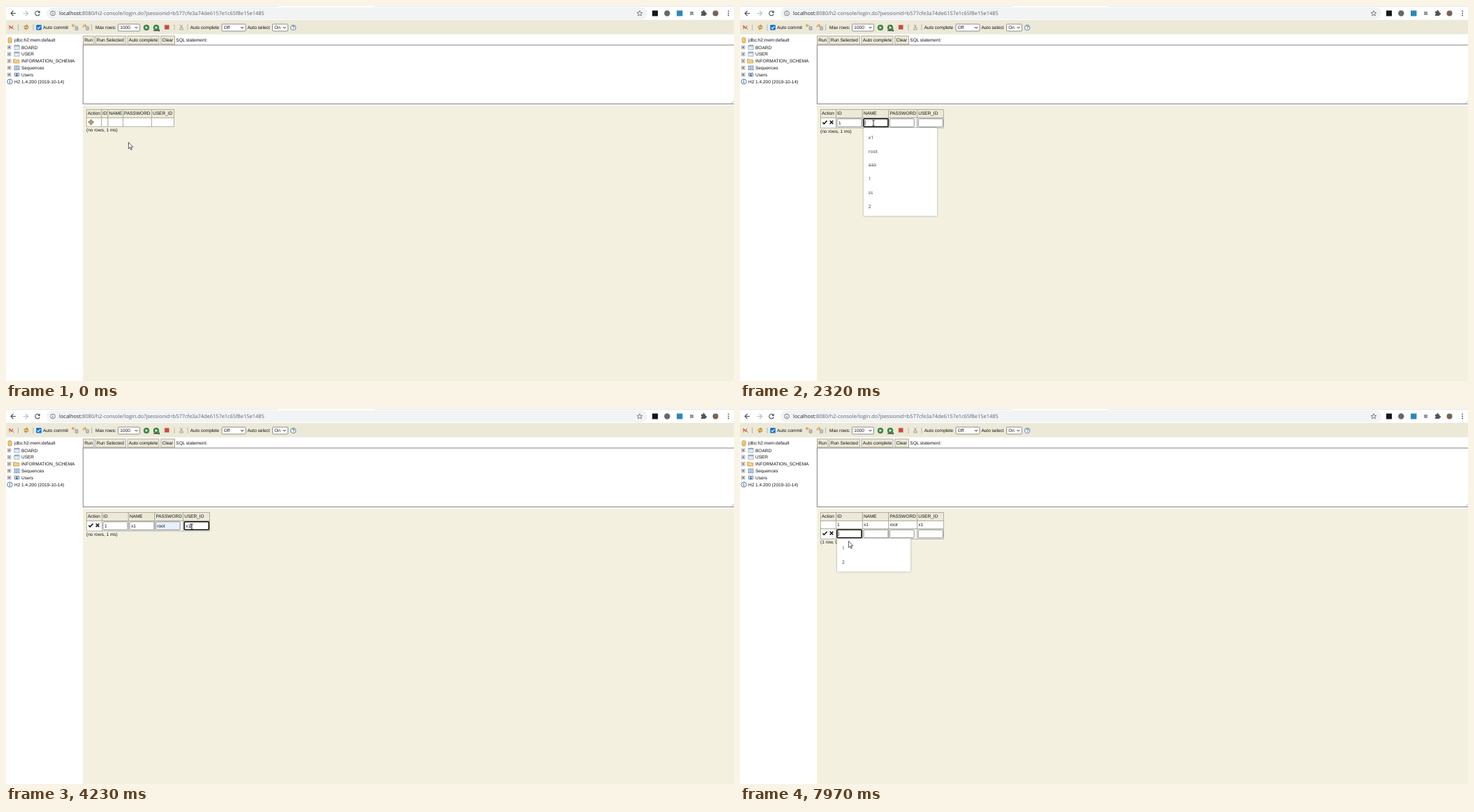
Animation, 1042 px wide and 538 px high, one loop 8000 ms. Source, as an HTML page:

```html
<!DOCTYPE html>
<html lang="en">
<head>
<meta charset="utf-8">
<title>Database console</title>
<style>
  html, body { margin: 0; width: 100%; height: 100%; overflow: hidden; background: #fff; }
  svg { display: block; width: 100%; height: 100%; }
  text { font: 6.5px "Liberation Sans", Arial, sans-serif; fill: #111; white-space: pre; text-rendering: geometricPrecision; }
  .ui { font-family: "Open Sans", "Noto Sans", sans-serif; font-size: 7.43px; fill: #5f6368; }
  .ui tspan { fill: #202124; }
  .item { font-family: "Open Sans", "Noto Sans", sans-serif; font-size: 6.7px; fill: #333; }
  .line { fill: none; stroke: #444; }
  .popup { filter: drop-shadow(0 .7px 1.2px #0006); }
</style>
</head>
<body>
<svg viewBox="0 0 1042 538" preserveAspectRatio="none">
  <g id="page"></g>
  <g id="live"></g>
</svg>
<script>
const LOOP = 8000;
const BEIGE = '#ece9d8', EDGE = '#aca899', GRAY = '#767676';

// Drawing helpers; text is placed by the middle of its capitals.
const text = (x, cy, s, cls = '') => `<text class="${cls}" x="${x}" y="${cy + 2.3}">${s}</text>`;
const box = (x, y, w, h, fill, stroke = 'none', more = '') =>
  `<rect x="${x}" y="${y}" width="${w}" height="${h}" fill="${fill}" stroke="${stroke}" ${more}/>`;
const disc = (x, y, r, fill, stroke = 'none', more = '') =>
  `<circle cx="${x}" cy="${y}" r="${r}" fill="${fill}" stroke="${stroke}" ${more}/>`;
const line = (d, color = '#444', width = 1, x = 0, y = 0) =>
  `<path class="line" transform="translate(${x} ${y})" d="${d}" style="stroke:${color};stroke-width:${width}"/>`;
const shape = (d, fill, x = 0, y = 0, more = '') =>
  `<path transform="translate(${x} ${y})" d="${d}" fill="${fill}" ${more}/>`;

function browserBar() {
  const info = disc(67, 10.5, 3.4, 'none', '#5f6368', 'stroke-width=".8"') +
    line('M67 10V12.4M67 8.4V9.2', '#5f6368', .9);
  return box(0, 0, 1042, 20, '#fff') +
    box(0, 0, 390, .8, '#dee1e6') + box(528, 0, 514, .8, '#dee1e6') +
    box(58, 2, 860, 17, '#f1f3f4', 'none', 'rx="8.5"') +
    line('M3.5 0H-3.5M0 -3.5L-3.5 0L0 3.5', '#4a4d51', 1.1, 10.5, 10.5) +
    line('M-3.5 0H3.5M0 -3.5L3.5 0L0 3.5', '#b9bbbe', 1.1, 28, 10.5) +
    line('M2.6 -2A3.3 3.3 0 1 0 3.2 1', '#4a4d51', 1.1, 45, 10.5) +
    shape('M3.6 -4V-.6H.2Z', '#4a4d51', 45, 10.5) + info +
    text(76, 10.6, '<tspan>localhost:</tspan>8080/h2-console/login.do?jsessionid=b577cfe3a74de6157e1c65f8e15e1485', 'ui') +
    shape('M0 -3.8L1.1 -1.2 3.8 -1 1.7 .8 2.4 3.4 0 2 -2.4 3.4 -1.7 .8 -3.8 -1 -1.1 -1.2Z', 'none', 907, 10.5, 'stroke="#5f6368" stroke-width=".8"') +
    box(925, 6.5, 8, 8, '#15161a') + disc(946.3, 10.5, 4.2, '#66686a') +
    box(960, 6.5, 8.4, 8, '#2c88b8') + box(979, 8, 5, 5, '#9a9a9a') +
    shape('M-3.6 -2.2H-1.2A1.3 1.3 0 1 1 1.2 -2.2H2.8V.1A1.3 1.3 0 1 1 2.8 2.4V4H-3.6V2.2A1.4 1.4 0 0 0 -3.6 -.4Z', '#505357', 998.5, 10) +
    disc(1015.5, 10.5, 4, '#7a6252') +
    [7.3, 10.4, 13.5].map(y => disc(1034, y, .9, '#4a4d51')).join('');
}

function select(x, w, label) {
  return box(x, 26, w, 10, '#fff', GRAY, 'rx="1.2" stroke-width=".8"') + text(x + 2.8, 31, label) +
    line('M-1.9 -1L0 1L1.9 -1', '#222', 1, x + w - 5, 31);
}

function toolbar() {
  const drum = x => box(x, 29.5, 4, 5, '#b8bfca', '#7b8494', 'rx="1" stroke-width=".6"');
  const play = x => disc(x, 31, 3.9, '#3f8f46', '#2d6b34', 'stroke-width=".6"') +
    shape('M-1.2 -2V2L2 0Z', '#fff', x, 31);
  return box(0, 20, 1042, 20.5, BEIGE) +
    [17.5, 39, 122.5, 241, 260].map(x => line('M0 26.5V35', EDGE, .8, x)).join('') +
    line('M-3 3V-2L0 2 2 -2.5M-3.5 -2.5L3.5 3', '#d0533c', 1, 8, 30.5) +
    line('M-3 .5C-3 -2 0 -3 2 -1.5M3 -.5C3 2 0 3 -2 1.5', '#d9962b', 1.5, 29, 30.5) +
    line('M.5 -4L2.5 -1.3 -.8 -.8M-.5 4L-2.5 1.3 .8 .8', '#a8721e', .8, 29, 30.5) +
    box(43.2, 27, 7.6, 7.6, '#1673d6', 'none', 'rx="1.2"') +
    line('M-2.2 0L-.6 1.7 2.3 -1.7', '#fff', 1.1, 47, 30.8) +
    text(53, 31, 'Auto commit') +
    drum(99) + line('M2 -2H-3M-1 -4L-3 -2 -1 0', '#d99a34', 1.1, 97.5, 30) +
    drum(114.5) + line('M-3 1V-2H1M-1 -4L1 -2 -1 0', '#d99a34', 1.1, 113.5, 30) +
    text(128, 31, 'Max rows:') + select(160.5, 31, '1000') +
    play(201) + play(215) + line('M211 35.3H220M219 33V36.5', '#222', .9) +
    box(227, 27.2, 6.4, 6.4, '#d8412f', '#b6aaa0', 'stroke-width=".7"') +
    line('M-2 -3.5L1 0M1.5 -3.5L-1 0M-2.5 3.5H2.5L1.5 .5H-1.5Z', '#999a92', .9, 251, 30.5) +
    text(263.7, 31, 'Auto complete') + select(309, 34, 'Off') +
    text(345.4, 31, 'Auto select') + select(381.5, 22, 'On') +
    disc(411.2, 31, 3.7, '#fff', '#4678a8', 'stroke-width=".9"') + text(409.4, 31, '?');
}

function tree() {
  const names = ['BOARD', 'USER', 'INFORMATION_SCHEMA', 'Sequences', 'Users'];
  const table = y => box(12, y - 3, 7, 6, '#fff', '#7590aa', 'stroke-width=".7"') +
    box(12, y - 3, 7, 1.6, '#7d9fc0') + line('M12 0H19M14.3 -2V3M16.7 -2V3', '#b3c4d4', .5, 0, y);
  const folder = y => shape('M-4 -2.5H-1L0 -1.5H4V3H-4Z', '#f6cf83', 14.7, y, 'stroke="#c5872c" stroke-width=".7"');
  const dots = y => [0, 1, 2].map(i => line('M11.5 0H19.5', '#3d6b9c', 1.3, 0, y - 2.2 + i * 2.4)).join('') +
    line('M14 -3V4M17 -3V4', '#fff', .7, 0, y);
  const people = y => line('M-2.3 -3Q-4 0 -2.3 3M2.3 -3Q4 0 2.3 3', '#2f5079', .9, 15.5, y) +
    disc(15.5, y - 1.4, 1.2, '#3f6796') + box(14.1, y, 2.8, 2.7, '#3f6796');
  const icons = [table, table, folder, dots, people];
  return box(3, 45.5, 5, 7.5, '#f3c773', '#bd832e', 'rx="1.6" stroke-width=".7"') +
    text(12, 49, 'jdbc:h2:mem:default') +
    names.map((name, i) => {
      const y = 59.2 + i * 9.8;
      return box(2.3, y - 2.2, 4.6, 4.6, '#fff', '#777', 'stroke-width=".6"') +
        line('M3.2 0H6M4.6 -1.4V1.4', '#222', .7, 0, y + .1) + icons[i](y) + text(22, y, name);
    }).join('') +
    disc(5.5, 108.5, 3.6, '#fff', '#3d6b9c', 'stroke-width=".9"') +
    line('M5.5 107.8V110.6M5.5 106V107', '#2f5079', 1) + text(12, 108.2, 'H2 1.4.200 (2019-10-14)');
}

function queryPane() {
  const buttons = [[110.5, 15.5, 'Run'], [128, 43.3, 'Run Selected'], [174, 45, 'Auto complete'], [221.8, 19.7, 'Clear']];
  return buttons.map(([x, w, s]) =>
      box(x, 43, w, 12, BEIGE, '#9b988b', 'stroke-width=".8"') + text(x + 1.8, 49, s)).join('') +
    text(243.3, 49, 'SQL statement:') +
    box(110.3, 56, 935, 84.5, '#fff', GRAY, 'stroke-width=".9"') +
    line('M1038.5 139.8L1042 136.5', GRAY, .6) +
    box(110, 143, 932, 395, '#f4f0e0');
}

// Pointer path: time, x, y.
const path = [
  [300, 175, 195], [840, 123, 168], [1110, 123, 168], [1410, 153, 168],
  [1900, 153, 168], [2200, 191, 168], [2690, 191, 168], [2850, 220, 167], [2980, 221, 167],
  [3220, 221, 167], [3480, 235, 186], [3620, 235, 186], [3930, 266, 169],
  [4290, 266, 169], [4770, 118, 166], [4850, 118, 166], [4910, 118, 168],
  [5700, 118, 168], [5800, 121, 172], [5940, 121, 172], [6070, 121, 176],
  [7050, 121, 176], [7400, 153, 179], [7640, 153, 179], [7960, 155, 189]
];
const clicks = [[870, 1080], [1440, 1690], [2200, 2300], [3130, 3220], [3530, 3620],
  [4020, 4080], [5060, 5400], [6380, 6530], [7420, 7610]];

function pointerAt(t) {
  const i = path.findIndex(p => p[0] > t);
  if (i === 0) return path[0].slice(1);
  if (i < 0) return path[path.length - 1].slice(1);
  const [a, b] = [path[i - 1], path[i]];
  const k = (t - a[0]) / (b[0] - a[0]), e = k * k * (3 - 2 * k);
  return [a[1] + (b[1] - a[1]) * e, a[2] + (b[2] - a[2]) * e];
}

const within = (t, a, b) => t >= a && t < b;
const heads = ['Action', 'ID', 'NAME', 'PASSWORD', 'USER_ID'];
const record = ['', '1', 'x1', 'root', 'x1'];
const fieldX = [139, 177, 214.3, 255.3];
const plainCols = [115.3, 136.5, 146, 167.5, 208.5, 240.5];
const editCols = [115.3, 137.5, 175.3, 212.8, 253.6, 291.5];

const row = (cols, y, h, fill, labels = []) => cols.slice(0, -1).map((x, i) =>
  box(x, y, cols[i + 1] - x, h, fill, EDGE, 'stroke-width=".9"') +
  (labels[i] ? text(x + 1.6, y + 5.6, labels[i]) : '')).join('');

const plus = y => shape('M-1.1 -3.5H1.1V-1.1H3.5V1.1H1.1V3.5H-1.1V1.1H-3.5V-1.1H-1.1Z', '#b9ae62', 121.7, y, 'stroke="#716b3c" stroke-width=".7"');
const okCancel = y => line('M-3 .2L-1 2.3 3.2 -2.3', '#111', 1.5, 121.3, y) +
  line('M-2.3 -2.3L2.3 2.3M2.3 -2.3L-2.3 2.3', '#111', 1.5, 131, y);
const rowIcons = y => line('M-2.5 2.5L2.5 -2.5M-3 3.2L-1 2.7', '#8b7f45', 1.4, 121.7, y) +
  line('M-2.2 -2.2L2.2 2.2M2.2 -2.2L-2.2 2.2', '#948a4c', 1.5, 131.5, y);

function formAt(t) {
  if (t >= 6530) return { focus: t >= 7420 ? 0 : -1, values: ['', '', '', ''] };
  const focus = t < 1440 || t >= 5060 ? -1 : t < 2200 ? 0 : t < 3130 ? 1 : t < 4020 ? 2 : 3;
  const typed = (a, b) => t < a ? '' : t < b ? 'x' : 'x1';
  return {
    focus,
    values: [t < 1830 ? '' : '1', typed(2480, 2600), t < 3390 ? '' : 'root', typed(4110, 4200)]
  };
}

function fields({ focus, values }, y, t) {
  const widths = { '': 0, '1': 3.6, x: 3.3, x1: 6.9 };
  return fieldX.map((x, i) => {
    const on = i === focus, fill = values[i] === 'root' ? '#e8f0fe' : '#fff';
    const caret = x + 2.2 + (widths[values[i]] || 0);
    return box(x, y, 35, 11.5, fill, on ? '#101010' : GRAY, `rx="1" stroke-width="${on ? 1.6 : .8}"`) +
      text(x + 2, y + 5.7, values[i]) +
      (on ? line('M0 -3.6V3.6', '#111', .7, caret, y + 5.8) : '');
  }).join('');
}

function popup(x, y, items, hover = -1) {
  return `<g class="popup">${box(x, y, 105.3, 8 + items.length * 19.7, '#fff', 'none', 'rx="1"')}</g>` +
    (hover < 0 ? '' : box(x, y + 4 + hover * 19.7, 105.3, 19.7, '#c8c8c8')) +
    items.map((s, i) => text(x + 7, y + 13.7 + i * 19.7, s, 'item')).join('');
}

function popups(t) {
  if (within(t, 2290, 2480)) return popup(176.8, 175, ['x1', 'root', 'aaa', '1', 'ss', '2']);
  if (within(t, 3200, 3620)) return popup(214.3, 175, ['root', 'aaa', '1', 'ss', 's', '2'], t < 3390 ? -1 : 0);
  if (within(t, 4050, 4110)) return popup(255.3, 175, ['x1', 'root', 'aaa', '1', 'ss', '2']);
  return t >= 7700 ? popup(139, 186, ['1', '2']) : '';
}

function resultTable(t) {
  if (t < 1050) return row(plainCols, 148.5, 12, BEIGE, heads) + row(plainCols, 160.5, 12.5, '#fff') +
    plus(166.7) + text(115, 177.3, '(no rows, 1 ms)');
  if (t < 5370) return row(editCols, 148.5, 12, BEIGE, heads) + row(editCols, 160.5, 14.5, '#fff') +
    okCancel(166.8) + fields(formAt(t), 161.8, t) + text(115, 179.5, '(no rows, 1 ms)');
  if (t < 6530) {
    const cols = plainCols.map((x, i) => i ? x + 1 : x);
    return row(cols, 148.5, 12, BEIGE, heads) + row(cols, 160.5, 12.5, '#fff', record) +
      row(cols, 173, 12.5, '#fff') + rowIcons(166.7) + plus(179) + text(115, 190, '(1 row, 0 ms)');
  }
  return row(editCols, 148.5, 12, BEIGE, heads) + row(editCols, 160.5, 11.5, '#fff', record) +
    row(editCols, 172, 14.5, '#fff') + okCancel(178.2) + fields(formAt(t), 173.3, t) +
    text(115, 191, '(1 row, 0 ms)');
}

function pointer(t) {
  const [x, y] = pointerAt(t);
  const editing = within(t, 1050, 5370) || t >= 6530;
  const fieldTop = t < 5370 ? 161.8 : 173.3;
  const onText = editing && within(y, fieldTop, fieldTop + 11.5) && fieldX.some(f => within(x, f, f + 35));
  // A freshly drawn icon is only raised once the pointer moves again.
  const fresh = within(t, 1050, 1110) || within(t, 5370, 5710) || within(t, 6530, 7050);
  const top = y < 173 ? 161 : 173;
  const raised = !fresh && within(x, 117, 127.5) && within(y, top, top + 11);
  return (raised ? line('M127.5 0V10.5H117', '#9d9992', .7, 0, top) : '') +
    (clicks.some(([a, b]) => within(t, a, b)) ? disc(x, y, 7, '#f0e020', 'none', 'opacity=".75"') : '') +
    (onText
      ? line('M-1.8 -4H-.5L0 -3.5 .5 -4H1.8M0 -3.5V3.5M-1.8 4H-.5L0 3.5 .5 4H1.8', '#111', .9, x, y)
      : shape('M.4 .5V9.8L2.5 7.8 3.9 11.2 5.3 10.6 3.9 7.3H6.8Z', '#fff', x, y, 'stroke="#111" stroke-width=".7"'));
}

document.getElementById('page').innerHTML = browserBar() + toolbar() + tree() + queryPane();
const live = document.getElementById('live');
let shown = '';
function draw() {
  const t = performance.now() % LOOP;
  const next = resultTable(t) + popups(t) + pointer(t);
  if (next !== shown) live.innerHTML = shown = next;
  requestAnimationFrame(draw);
}
draw();
</script>
</body>
</html>
```
